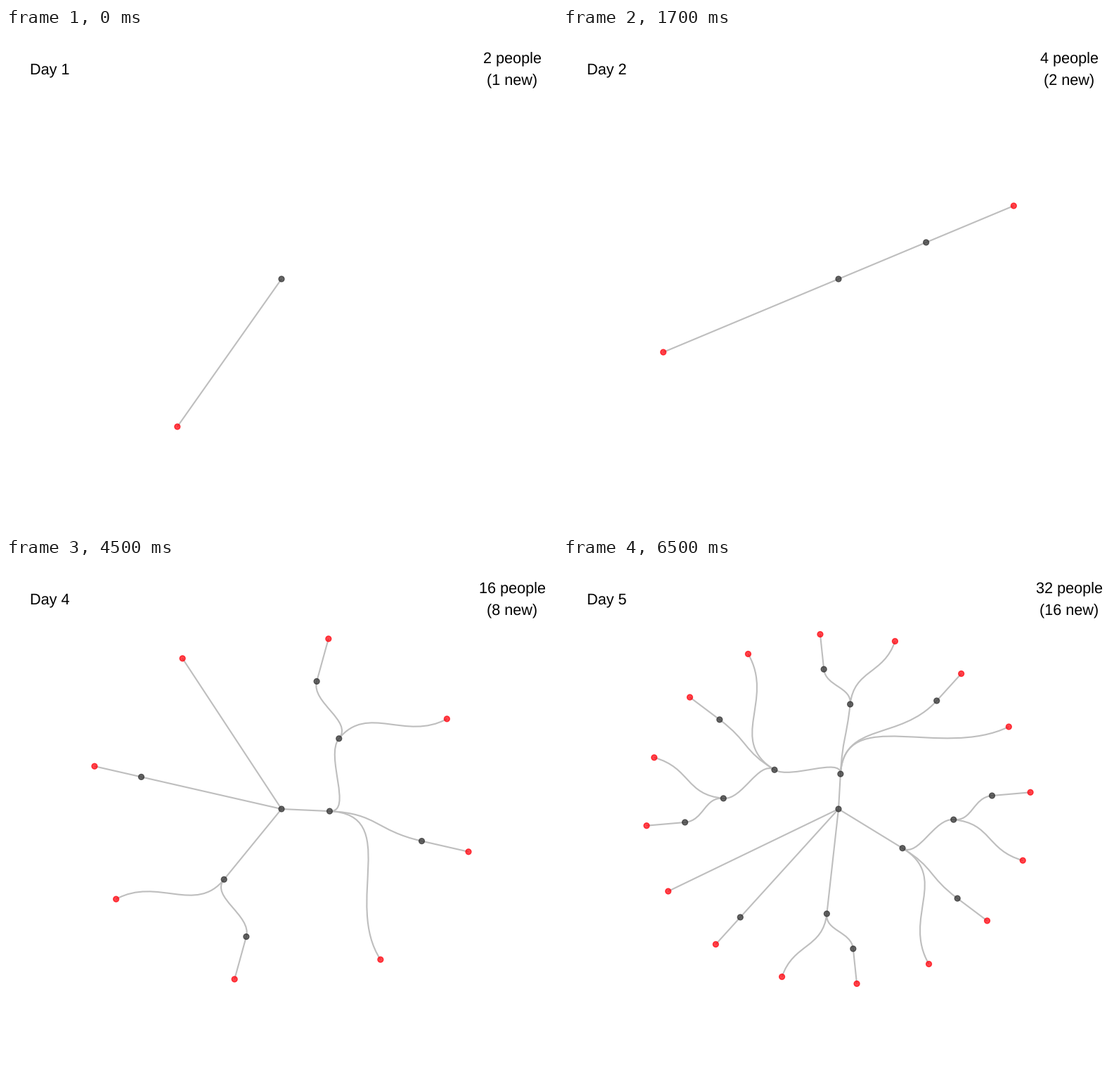
Animation of 784 by 714 pixels, one loop 8 s. Source, as a matplotlib script:

```python
import numpy as np
import matplotlib.pyplot as plt
from matplotlib.animation import FuncAnimation
from matplotlib.collections import PathCollection
from matplotlib.patches import Circle
from matplotlib.path import Path

W, H, DPI = 784, 714, 100
PX = 72 / DPI
CENTER = np.array([W / 2, H / 2])
RADII = np.array([274.3, 249.6])
# Angle in degrees of the first leaf on each day
START = [237.3, 24.65, 184.18, 75.9, 185.45]
EDGE = "#bebebe"
DARK, RED = (0.2, 0.2, 0.2, 0.75), (1.0, 0.02, 0.06, 0.75)

plt.rcParams["font.family"] = "Liberation Sans"
plt.rcParams["text.hinting"] = "none"

fig = plt.figure(figsize=(W / DPI, H / DPI), dpi=DPI, facecolor="white")
ax = fig.add_axes([0, 0, 1, 1])


def to_stage(radius, degrees):
    a = np.radians(degrees)
    return CENTER + RADII * radius * np.array([np.cos(a), -np.sin(a)])


def build_tree(day):
    """Everyone infects one new person per day: a binomial tree of this order."""
    step = 360 / 2 ** (day - 1)
    nodes, edges = [], []

    def place(order, first):
        """Place a subtree whose first leaf is number `first`; return its root."""
        radius = 1 - order / day
        if order == 0:
            node = (radius, START[day - 1] - first * step)
        else:
            children = []
            for k in reversed(range(order)):
                children.append(place(k, first))
                first += 2 ** (k - 1) if k else 1
            node = (radius, (children[0][1] + children[-1][1]) / 2)
            edges.extend((node, child) for child in children)
        nodes.append((node, order))
        return node

    place(day, 0)
    return nodes, edges


def edge_path(parent, child):
    """Diagonal with both control points at the middle radius."""
    (r0, a0), (r1, a1) = parent, child
    if r0 == 0:
        return Path([to_stage(r0, a0), to_stage(r1, a1)])
    mid = (r0 + r1) / 2
    points = [to_stage(r0, a0), to_stage(mid, a0), to_stage(mid, a1), to_stage(r1, a1)]
    return Path(points, [Path.MOVETO] + [Path.CURVE4] * 3)


def draw_dot(node, color):
    ax.add_patch(Circle(to_stage(*node), 3.9, facecolor=color, edgecolor=color,
                        linewidth=1.4 * PX, zorder=2))


def label(x, baseline, text, align):
    ax.text(x, baseline, text, ha=align, va="baseline", size=21.6 * PX, color="black")


def update(i):
    day = (i + 3) // 4 + 1
    ax.clear()
    ax.set(xlim=(0, W), ylim=(H, 0))
    ax.axis("off")
    nodes, edges = build_tree(day)
    ax.add_collection(PathCollection([edge_path(*e) for e in edges], facecolor="none",
                                     edgecolor=EDGE, linewidth=2.1 * PX, zorder=1),
                      autolim=False)
    for node, order in nodes:
        draw_dot(node, DARK if order else RED)
    label(33.6, 65, f"Day {day}", "left")
    label(720.5, 50, f"{2 ** day} people", "center")
    label(720.5, 81, f"({2 ** (day - 1)} new)", "center")
    return []


anim = FuncAnimation(fig, update, frames=16, interval=500, repeat=True,
                     repeat_delay=0, init_func=lambda: [])
plt.show()
```
